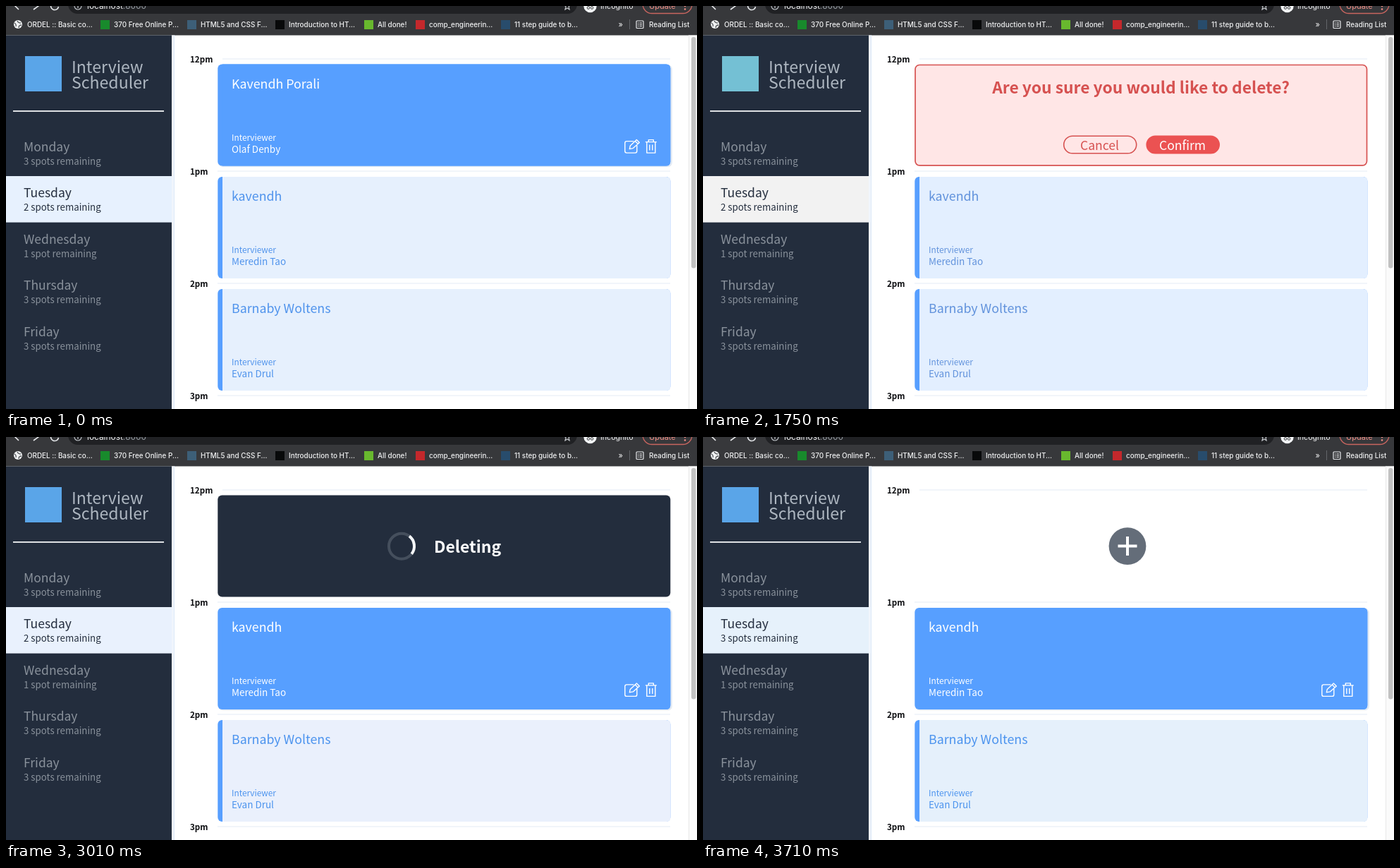
Animation of 980 by 571 pixels, one loop 4.06 s. Source, as an HTML page:

```html
<!DOCTYPE html>
<html lang="en">
<head>
<meta charset="utf-8">
<title>Interview Scheduler</title>
<style>
html, body { margin: 0; width: 100%; height: 100%; overflow: hidden; background: #fff; }
svg { display: block; width: 980px; height: 571px; }
text { font-family: "Noto Sans CJK JP", "Noto Sans CJK SC", "Noto Sans", sans-serif; white-space: pre; }
.bar text { font-family: Inter, sans-serif; fill: #f1f2f3; }
.light { font-weight: 300; }
.bold { font-weight: 700; }
</style>
</head>
<body>
<svg id="stage" viewBox="0 0 980 571"></svg>
<script>
const LOOP = 4060, STEP = 70;
const NS = "http://www.w3.org/2000/svg";
const stage = document.getElementById("stage");
const INK = "#232d3d", BLUE = "#579fff", RED = "#d65150";

function add(parent, tag, attrs, content) {
  const el = document.createElementNS(NS, tag);
  for (const key in attrs) el.setAttribute(key, attrs[key]);
  if (content) el.textContent = content;
  return parent.appendChild(el);
}
const group = (parent, attrs) => add(parent, "g", attrs);
const rect = (p, x, y, width, height, fill, rx = 0, more) =>
  add(p, "rect", { x, y, width, height, fill, rx, ...more });
const circle = (p, cx, cy, r, fill, more) => add(p, "circle", { cx, cy, r, fill, ...more });
const line = (p, d, stroke, width = 1, more) =>
  add(p, "path", { d, fill: "none", stroke, "stroke-width": width, ...more });
const label = (p, x, y, size, content, more) =>
  add(p, "text", { x, y, "font-size": size, ...more }, content);
const show = (el, on) => el.setAttribute("display", on ? "inline" : "none");

// Browser bar
const bar = group(stage, { class: "bar" });
rect(bar, 0, 0, 980, 41.5, "#37383b");
rect(bar, 88, -16, 722, 27, "#202124", 13.5);
line(bar, "M20 -5L13 0L18 5M39 5L46 0L41 -5", "#e8eaed", 1.6);
line(bar, "M64.5 -3A5.5 5.5 0 1 0 74.5 1", "#e8eaed", 1.6);
circle(bar, 102, 0, 5, "none", { stroke: "#bdc1c6", "stroke-width": 1.2 });
line(bar, "M102 -1V3", "#bdc1c6", 1.3);
const url = label(bar, 115, 4, 11.9, "localhost");
add(url, "tspan", { fill: "#9aa0a6" }, ":8000");
line(bar, "M793 5L796 3L799 5L798 1L800 -1H792L794 1Z", "#c4c7cb", 1.2);
circle(bar, 828.5, 0, 9.2, "#f1f3f4");
line(bar, "M823.5 -1H833.5", "#35363a", 1.5);
circle(bar, 826, 2.5, 1.8, "none", { stroke: "#35363a" });
circle(bar, 831, 2.5, 1.8, "none", { stroke: "#35363a" });
label(bar, 843, 4, 10.6, "Incognito");
rect(bar, 903, -16, 70, 26.5, "#37383b", 13, { stroke: "#c9655f", "stroke-width": 1.3 });
label(bar, 912, 4, 11, "Update", { style: "fill:#ef8d84" });
circle(bar, 963, 0, 1.3, "#ef8d84");
circle(bar, 963, 4.5, 1.3, "#ef8d84");

circle(bar, 17, 26, 6, "#f1f3f4");
line(bar, "M12 24Q15 26 14 29M16 21Q17 24 21 24M18 31Q18 27 22 27", "#55585c", 1.3);
const bookmarks = [
  [30, "ORDEL :: Basic co..."],
  [153, "370 Free Online P...", "#188a2c"],
  [276, "HTML5 and CSS F...", "#3d5f78"],
  [401, "Introduction to HT...", "#08090a"],
  [527, "All done!", "#68b82e"],
  [600, "comp_engineerin...", "#c4282c"],
  [721, "11 step guide to b...", "#284c6c"]
];
for (const [x, name, color] of bookmarks) {
  if (color) rect(bar, x - 19, 20, 13, 13, color);
  label(bar, x, 30, 9.9, name, { "font-weight": 500 });
}
label(bar, 868.5, 30, 11, "»");
line(bar, "M884.5 19V33", "#64666a");
rect(bar, 894, 21, 10, 10.5, "none", 1, { stroke: "#e8eaed", "stroke-width": 1.2 });
line(bar, "M896 24H897.3M898.5 24H902M896 26.3H897.3M898.5 26.3H902M896 28.6H897.3M898.5 28.6H902", "#e8eaed");
label(bar, 912, 30, 9.8, "Reading List", { "font-weight": 500 });

// Sidebar
rect(stage, 0, 41.5, 235, 530, INK);
rect(stage, 235, 41.5, 4, 530, "#f0f5fc");
rect(stage, 238, 41.5, 1, 530, "#dde9f8");
const mark = rect(stage, 27, 71, 52, 50, BLUE);
for (const [y, word] of [[94.5, "Interview"], [117, "Scheduler"]])
  label(stage, 93, y, 23.1, word, { class: "light", fill: "#aeb7c1" });
rect(stage, 10, 148, 214, 1.8, "#f2f4f6");
const today = rect(stage, 0, 241, 235, 65.6, "#e7f1fe");
let todaySpots;
["Monday", "Tuesday", "Wednesday", "Thursday", "Friday"].forEach((day, i) => {
  const y = 206 + i * 65.4, active = i === 1;
  label(stage, 25, y, 17.5, day, { fill: active ? INK : "#8a929c" });
  const spots = label(stage, 25, y + 19, 13.28, i === 2 ? "1 spot remaining" : "3 spots remaining",
    { class: "light", fill: active ? INK : "#8a929c" });
  if (active) todaySpots = spots;
});

// Schedule
["12pm", "1pm", "2pm", "3pm"].forEach((hour, i) => {
  const y = 75 + i * 159;
  label(stage, 261, y + 5.3, 11.6, hour, { class: "bold", fill: "#0c0d10" });
  rect(stage, i ? 300 : 307, y - 0.5, i ? 642 : 635, 1, "#e3ecf5");
});
rect(stage, 968, 41.5, 12, 530, "#fafafa");
rect(stage, 968, 41.5, 1, 530, "#e8e8e8");
rect(stage, 972, 44, 6.5, 327.5, "#c1c1c1", 3.25);

function makeCard(y, student, interviewer) {
  const g = group(stage, { transform: `translate(300.3 ${y})` });
  const shadow = rect(g, 1, 1, 643.5, 144.5, "#e2eaf4", 6);
  rect(g, 0, 0, 642, 144, BLUE, 6);
  const face = add(g, "path", { d: "M6.7 0H636Q642 0 642 6V138Q642 144 636 144H6.7Z" });
  const words = group(g, {});
  label(words, 19.7, 34.3, 17.8, student);
  label(words, 19.7, 108.3, 11.8, "Interviewer", { class: "light" });
  label(words, 19.7, 125.3, 13.5, interviewer);
  const icons = group(g, { stroke: "#fff", fill: "none", "stroke-width": 1.4, "stroke-linejoin": "round" });
  add(icons, "path", { d: "M590 109H580Q577.5 109 577.5 111.5V123Q577.5 125.5 580 125.5H592Q594.5 125.5 594.5 123V115" });
  add(icons, "path", { d: "M584 120L585 115.5L594 107L598 111L589 119Z M592 109L596 113" });
  const bin = add(icons, "path", {
    d: "M606.5 110H622.5M611 110V107H618V110M608.5 110V125.5H620.5V110M612.5 114V122M616.5 114V122"
  });
  return { g, shadow, face, words, icons, bin };
}
function paintCard(card, hover, look) {
  show(card.shadow, hover);
  show(card.icons, hover);
  card.face.setAttribute("fill", hover ? BLUE : look.card);
  card.words.setAttribute("fill", hover ? "#fff" : look.text);
}
const first = makeCard(82.6, "Kavendh Porali", "Olaf Denby");
const second = makeCard(241.9, "kavendh", "Meredin Tao");
const third = makeCard(401, "Barnaby Woltens", "Evan Drul");

// Confirmation
const confirm = group(stage, {});
rect(confirm, 301, 83.5, 640.5, 142.3, "#ffe6e6", 6, { stroke: RED, "stroke-width": 1.7 });
label(confirm, 621, 124, 22.8, "Are you sure you would like to delete?",
  { class: "bold", fill: RED, "text-anchor": "middle" });
const [cancelButton, confirmButton] = [[511, "Cancel"], [628.5, "Confirm"]].map(([x, name]) => ({
  pill: rect(confirm, x + 0.7, 184.2, 103, 24.6, "none", 12.3, { stroke: RED, "stroke-width": 1.6 }),
  name: label(confirm, x + 51.5, 203.5, 17.5, name, { fill: RED, "text-anchor": "middle" })
}));

// Progress
const busy = group(stage, {});
rect(busy, 300.3, 82.6, 642, 144, INK, 6);
circle(busy, 561, 154.7, 18, "none", { stroke: "#454f5d", "stroke-width": 4 });
const arc = line(busy, "M573.73 141.97A18 18 0 0 1 573.73 167.43", "#f4f6f8", 4);
label(busy, 607, 163.5, 23, "Deleting", { class: "bold", fill: "#fff" });

// Empty slot
const empty = group(stage, {});
circle(empty, 602, 154.6, 26.4, "#646d79");
line(empty, "M588.5 154.6H615.5M602 141.1V168.1", "#fff", 4);

const looks = {
  rest: { today: "#e7f1fe", card: "#e6f0fd", text: "#4f93ec", mark: "#5aa5e8" },
  ask: { today: "#f2f2f2", card: "#e3efff", text: "#6192dc", mark: "#74c0d4" },
  wait: { today: "#e7f1fe", card: "#e6f0fd", text: "#5b90da", mark: "#74c0d4" },
  pass: { today: "#e9f1fd", card: "#eaf0fc", text: "#4b93ee", mark: "#5aa5e8" },
  done: { today: "#e6f1fb", card: "#e5f0fb", text: "#4b93ee", mark: "#5aa5e8" }
};
const scenes = [
  [0, "show", "rest"],
  [910, "ask", "ask"],
  [2450, "busy", "wait"],
  [3010, "busy", "pass"],
  [3220, "busy", "wait"],
  [3570, "empty", "wait"],
  [3710, "empty", "done"]
];

function draw(time) {
  const t = Math.floor((time % LOOP) / STEP) * STEP;
  const [, mode, lookName] = scenes.filter(s => s[0] <= t).pop();
  const look = looks[lookName];
  show(first.g, mode === "show");
  show(confirm, mode === "ask");
  show(busy, mode === "busy");
  show(empty, mode === "empty");

  today.setAttribute("fill", look.today);
  mark.setAttribute("fill", look.mark);
  todaySpots.textContent = (mode === "empty" ? 3 : 2) + " spots remaining";
  paintCard(first, true, look);
  paintCard(second, lookName === "pass" || lookName === "done", look);
  paintCard(third, false, look);

  const grow = 1 + 0.08 * Math.min(1, Math.max(0, (t - 280) / 280));
  first.bin.setAttribute("transform", `translate(614.5 116.2) scale(${grow}) translate(-614.5 -116.2)`);

  const armed = t >= 1750;
  confirmButton.pill.setAttribute("fill", armed ? "#eb5252" : "none");
  confirmButton.pill.setAttribute("stroke", armed ? "#eb5252" : RED);
  confirmButton.name.setAttribute("fill", armed ? "#fff" : RED);
  arc.setAttribute("transform", `rotate(${151 + (t - 2450) * 0.36} 561 154.7)`);
}

const start = performance.now();
function tick() {
  draw(performance.now() - start);
  requestAnimationFrame(tick);
}
tick();
</script>
</body>
</html>
```
